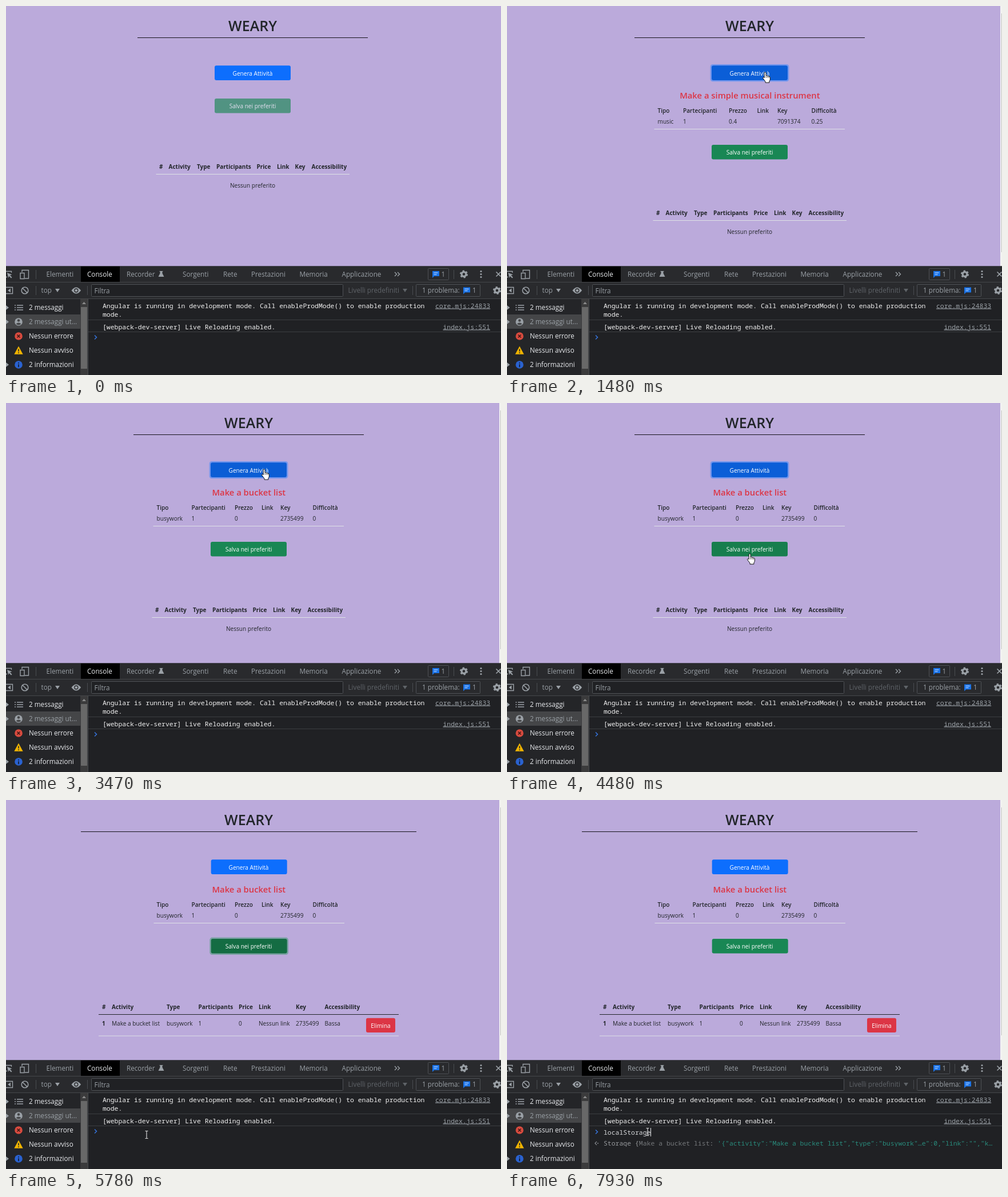
These frames come from a looping animation (866 by 646 pixels, 8 s). An HTML page:

```html
<!DOCTYPE html>
<html lang="it">
<head>
<meta charset="utf-8">
<title>Weary</title>
<style>
html, body { margin: 0; width: 100%; height: 100%; overflow: hidden; background: #bbaadb; }
svg { display: block; width: 866px; height: 646px; }
text { font: 10.1px "Open Sans", "Noto Sans", sans-serif; fill: #212529; white-space: pre; }
text.h1 { font-size: 25px; font-weight: 600; }
text.activity { font-size: 14.8px; font-weight: 600; fill: #dc3545; }
text.semi { font-weight: 600; }
text.bold { font-size: 10px; font-weight: 700; }
text.white { fill: #fff; }
text.ui { font-size: 11.7px; fill: #9aa0a6; }
text.lit { font-size: 11.7px; fill: #e8eaed; }
text.off { font-size: 11.7px; fill: #5f6368; }
text.mono, text.link { font: 500 11.46px "Noto Sans Mono", "DejaVu Sans Mono", monospace; fill: #f1f1f1; }
text.link { font-weight: 400; fill: #9aa0a6; text-decoration: underline; }
</style>
</head>
<body>
<svg viewBox="0 0 866 646" xmlns="http://www.w3.org/2000/svg">
  <g id="page"></g>
  <g id="tools"></g>
  <g id="prompt"></g>
  <g id="pointer"></g>
</svg>
<script>
const LOOP = 8000;
const T = {
  hover: 1060, focus: 1200, loaded: 1410, second: 2330, third: 3400,
  leave: 4240, saveHover: 4410, saveClick: 4830, saved: 5030,
  consoleClick: 6060, caretOff: 6570, recall: 7040, recallOff: 7530, preview: 7930
};

const text = (x, y, s, cls = '', anchor = 'start') =>
  `<text x="${x}" y="${y}" class="${cls}" text-anchor="${anchor}">${s}</text>`;
const rect = (x, y, w, h, fill, extra = '') =>
  `<rect x="${x}" y="${y}" width="${w}" height="${h}" fill="${fill}" ${extra}/>`;
const path = (d, fill, stroke = 'none', width = 1) =>
  `<path d="${d}" fill="${fill}" stroke="${stroke}" stroke-width="${width}"/>`;
const circle = (x, y, r, fill, stroke = 'none', width = 1) =>
  `<circle cx="${x}" cy="${y}" r="${r}" fill="${fill}" stroke="${stroke}" stroke-width="${width}"/>`;
const at = (x, y, body) => `<g transform="translate(${x} ${y})">${body}</g>`;
const row = (xs, y, labels, cls) => labels.map((s, i) => text(xs[i], y, s, cls)).join('');
const clamp = v => Math.max(0, Math.min(1, v));
const between = (t, a, b) => t >= a && t < b;

function mix(a, b, k) {
  const channel = (c, i) => parseInt(c.slice(1 + 2 * i, 3 + 2 * i), 16);
  return `rgb(${[0, 1, 2].map(i => Math.round(channel(a, i) + (channel(b, i) - channel(a, i)) * k))})`;
}

// Follows colour changes [time, colour], each eased over 150 ms.
function fade(t, stops) {
  let i = stops.length - 1;
  while (i > 0 && t < stops[i][0]) i--;
  return i ? mix(stops[i - 1][1], stops[i][1], clamp((t - stops[i][0]) / 150)) : stops[0][1];
}

function button(cx, y, label, fill, ring, labelX = cx) {
  const x = cx - 66.5;
  return (ring ? rect(x - 2.4, y - 2.4, 137.8, 30.4, ring, 'rx="4.5"') : '') +
    rect(x, y, 133, 25.6, fill, 'rx="3"') +
    text(labelX, y + 17.3, label, 'white', 'middle');
}

const BLUE = '#0d6efd', BLUE_HOVER = '#0b5ed7', BLUE_DOWN = '#0a58ca';
const GREEN = '#198754', GREEN_HOVER = '#157347', GREEN_DOWN = '#146c43';
const blueStops = [[0, BLUE], [T.hover, BLUE_HOVER], [T.focus, BLUE_DOWN], [1330, BLUE_HOVER],
  [2120, BLUE_DOWN], [2250, BLUE_HOVER], [3240, BLUE_DOWN], [3340, BLUE_HOVER], [T.saveClick, BLUE]];
const greenStops = [[0, GREEN], [T.saveHover, GREEN_HOVER], [T.saveClick, GREEN_DOWN], [T.consoleClick, GREEN]];

const musicColumns = [263.5, 308, 388, 437.5, 473, 532.5];
const busyColumns = [263.5, 324.5, 400, 447, 480, 536.5];
const activities = [
  [T.loaded, 'Make a simple musical instrument', musicColumns, ['music', 1, 0.4, '', 7091374, 0.25]],
  [T.second, 'Listen to a new music genre', musicColumns, ['music', 1, 0, '', 4708863, 0]],
  [T.third, 'Make a bucket list', busyColumns, ['busywork', 1, 0, '', 2735499, 0]]
];
const activityHeads = ['Tipo', 'Partecipanti', 'Prezzo', 'Link', 'Key', 'Difficoltà'];
const savedHeads = ['#', 'Activity', 'Type', 'Participants', 'Price', 'Link', 'Key', 'Accessibility'];
const emptyColumns = [268, 284.5, 334, 368, 438.5, 474, 505.5, 534.5];
const savedColumns = [168, 185, 281, 336.5, 407, 442, 507, 557.5];

function drawPage(t) {
  const loaded = t >= T.loaded, saved = t >= T.saved;
  const cx = loaded ? 424.5 : 431.5;
  const bx = saved ? 425.2 : cx;
  const ruleHalf = saved ? 293.5 : 201.5;
  const pale = '#dee2e6';
  let out = rect(0, 0, 866, 456, '#bbaadb') +
    text(cx, 43.5, 'WEARY', 'h1', 'middle') +
    rect(Math.round(cx - ruleHalf), 55, 2 * ruleHalf, 1, '#15131a') +
    button(bx, 104.3, 'Genera Attività', fade(t, blueStops),
      between(t, T.focus, T.saveClick) && 'rgba(49,132,253,.5)', cx);

  const save = button(bx, loaded ? 243 : 162, 'Salva nei preferiti', fade(t, greenStops),
    between(t, T.saveClick, T.consoleClick) && 'rgba(60,153,110,.5)', cx);
  out += loaded ? save : `<g opacity=".65">${save}</g>`;

  if (loaded) {
    const [, title, xs, values] = activities.filter(a => t >= a[0]).pop();
    out += text(cx + .3, 161.5, title, 'activity', 'middle') +
      row(xs, 186.6, activityHeads, 'semi') + row(xs, 205.8, values) +
      rect(saved ? 258.5 : 257.5, 215, 333.5, 1, pale) +
      rect(863, 0, 3, 456, '#f1f1f1') +
      rect(865, 13, 1, (saved ? 412 : 431) - 13, '#c1c1c1');
  }

  if (saved) {
    out += row(savedColumns, 366, savedHeads, 'bold') + rect(162, 375, 525, 1, '#212529') +
      text(168, 394.5, '1', 'bold') +
      row(savedColumns.slice(1), 394.5, ['Make a bucket list', 'busywork', 1, 0, 'Nessun link', 2735499, 'Bassa']) +
      rect(630, 381.7, 51, 25.3, '#dc3545', 'rx="3"') +
      text(655.5, 398.5, 'Elimina', 'white', 'middle') + rect(162, 412.5, 525, 1, pale);
  } else {
    out += at(loaded ? -7 : 0, loaded ? 81 : 0,
      row(emptyColumns, 285, savedHeads, 'bold') + rect(262.5, 294, 338.5, 1, pale) +
      text(431.5, 317.7, 'Nessun preferito', '', 'middle'));
  }
  return out;
}

const GREY = '#9aa0a6';
const separator = (x, y) => rect(x, y - 8, 1, 16, '#494c50');
const arrowDown = (x, y, fill) => path(`M${x - 4} ${y - 3}h8l-4 6z`, fill);
const arrowRight = y => path(`M0 ${y - 4}l5 4l-5 4z`, GREY);
const bubble = (x, y) => path(`M${x} ${y - 5}h12v9h-9l-3 3z`, '#1a73e8') +
  path(`M${x + 2.5} ${y - 2}h7M${x + 2.5} ${y + 1}h5`, 'none', '#cfe2ff');
const frame = (x, y, w, h, fill = 'none') => rect(x + .5, y + .5, w, h, fill, 'stroke="#4f5256" rx="1"');
const gear = (x, y) =>
  `<circle cx="${x}" cy="${y}" r="5.8" fill="none" stroke="${GREY}" stroke-width="2.6" stroke-dasharray="3.04"/>` +
  circle(x, y, 3.9, 'none', GREY, 3.2);

function drawTools() {
  const tabs = [[70.5, 'Elementi'], [211, 'Recorder'], [309, 'Sorgenti'], [380, 'Rete'],
    [429, 'Prestazioni'], [513.5, 'Memoria'], [587.5, 'Applicazione']];
  const sidebar = ['2 messaggi', '2 messaggi ut...', 'Nessun errore', 'Nessun avviso', '2 informazioni'];
  let out = rect(0, 455.5, 866, 191, '#202124') + rect(0, 455.5, 866, 57, '#292a2d') +
    rect(0, 483, 866, 1, '#45474a') + rect(0, 512, 866, 1, '#45474a') +
    rect(131, 456, 68, 27, '#000') + text(142, 474, 'Console', 'lit') +
    tabs.map(([x, s]) => text(x, 474, s, 'ui')).join('');

  // Upper toolbar
  out += path('M0 464.5H9.5V467M0 474.5H2', 'none', GREY, 1.3) + path('M2 467l8.5 3.2-3.5 1.3 3.5 3.5-1.5 1.5-3.5-3.5-1.3 3z', GREY) +
    path('M28 466V462.5H39.5V477H33', 'none', GREY, 1.4) + path('M25 467.5H32V477.5H25z', 'none', GREY, 1.4) +
    separator(52, 470) + path('M268.5 464h6v1h-1v3l3 6h-10l3-6v-3h-1z', GREY) +
    path('M680 466l3.5 3.5-3.5 3.5M685 466l3.5 3.5-3.5 3.5', 'none', GREY, 1.4) +
    frame(738, 459, 36, 20) + bubble(746, 469) + text(761.5, 474, '1', 'ui') +
    separator(783, 470) + gear(801, 469.5) +
    [464.5, 469.5, 474.5].map(y => circle(831, y, 1.6, GREY)).join('') +
    path('M857.5 465.5l8 8m0-8l-8 8', 'none', GREY, 1.7);

  // Console toolbar
  out += path('M0 492.5H11.5V503.5H0', 'none', GREY, 1.4) + path('M8 494.5v7l-5-3.5z', GREY) +
    circle(33, 498, 5.8, 'none', GREY, 1.6) + path('M29 494l8 8', 'none', GREY, 1.6) +
    separator(52, 498) + text(61.5, 502, 'top', 'ui') + arrowDown(90, 498, GREY) +
    path('M114.5 498q8.3-11 16.6 0q-8.3 11-16.6 0z', GREY) + circle(122.8, 498, 3, GREY, '#292a2d', 1.3) +
    separator(142, 498) + frame(149, 487, 440, 21, '#202124') + text(154.5, 502.5, 'Filtra', 'ui') +
    text(598.5, 502, 'Livelli predefiniti', 'off') + arrowDown(698, 498, '#5f6368') +
    separator(711, 498) + frame(717, 487, 112, 21) + text(728, 502, '1 problema:', 'ui') +
    bubble(800, 497.5) + text(816, 502, '1', 'ui') + gear(859, 498);

  // Sidebar
  out += rect(0, 513, 130, 133, '#242528') + rect(0, 540, 130, 25, '#454648') +
    rect(130, 513, 13, 133, '#3b3b3c') + rect(131, 527, 11, 108, '#686868') + rect(143, 513, 1, 133, '#494c50') +
    path('M133 522l3.5-4 3.5 4z', '#8b8b8b') +
    sidebar.map((s, i) => text(40, 532.3 + 25 * i, s, i === 1 ? 'ui' : 'lit')).join('') +
    [528, 553, 628].map(arrowRight).join('') +
    path('M15 524h2m2 0h11M15 528h2m2 0h11M15 532h2m2 0h11', 'none', GREY, 1.5) +
    circle(22, 553, 6.8, GREY) + circle(22, 550.5, 2.3, '#454648') + path('M17.5 556.5q4.5-4 9 0q-4.5 4-9 0z', '#454648') +
    circle(22, 578, 6.8, '#d94b3f') + path('M19.5 575.5l5 5m0-5l-5 5', 'none', '#3a1713', 1.5) +
    path('M22 597l6.5 12h-13z', '#f0b400', '#f0b400', 1.4) + path('M22 600.5v4.3m0 1.5v1.7', 'none', '#292a2d', 1.7) +
    circle(22, 628, 6.8, '#2a62d0') + path('M22 624v1.8m0 1.4v5', 'none', '#17233d', 1.9);

  // Messages
  return out + text(169, 528.5, 'Angular is running in development mode. Call enableProdMode() to enable production', 'mono') +
    text(169, 543.5, 'mode.', 'mono') + text(751, 528.5, 'core.mjs:24833', 'link') +
    rect(144, 549, 722, 1, '#3c3e41') +
    text(169, 565.5, '[webpack-dev-server] Live Reloading enabled.', 'mono') +
    text(764.5, 565.5, 'index.js:551', 'link') + rect(144, 570, 722, 1, '#3c3e41');
}

function drawPrompt(t) {
  const command = t >= T.preview ? 'localStorage' : t >= T.recall ? 'localStorage.clear()' : '';
  const caretOn = between(t, T.consoleClick, T.caretOff) || between(t, T.recall, T.recallOff) || t >= T.preview;
  const y = command ? 581 : 580;
  let out = path(`M155 ${y - 3.5}l3.5 3.5-3.5 3.5`, 'none', '#3674dc', 1.5) +
    `<text x="169" y="585.5" class="mono" style="fill:#d5d7da;font-weight:400">${command}</text>`;
  if (caretOn) out += rect(Math.floor(168.8 + command.length * 6.876), 574, 1, 15, '#e8eaed');
  if (t >= T.preview) {
    const span = (fill, s) => `<tspan fill="${fill}">${s}</tspan>`;
    const value = `'{"activity":"Make a bucket list","type":"busywork"…e":0,"link":"","k…`;
    out += path('M157 598l-3 3 3 3', 'none', '#85898e', 1.2) + circle(159, 601, 1, '#85898e') +
      '<clipPath id="line"><rect x="150" y="590" width="716" height="17"/></clipPath><g clip-path="url(#line)">' +
      text(169, 605, span('#96999c', 'Storage {') + span('#74777a', 'Make a bucket list') +
        span('#96999c', ': ') + span('#298b7c', value), 'mono') + '</g>';
  }
  return out;
}

const shapes = {
  arrow: path('M0 0V14.5l3.4-3.2 2.3 5.2 2.2-1-2.3-5.1h4.7z', '#fff', '#000', .9),
  hand: `<g transform="scale(.93)">${path('M-2 1.5a1.6 1.6 0 0 1 3.2 0V6.5c1.4-.8 2.8-.2 3 .6 1.2-.6 2.5 0 2.6.9 1.2-.3 2.2.3 2.2 1.5V13c0 2-1.3 3-1.6 4.2V19.5H0V17.5C-1.2 15.5-3.2 13.5-4.6 11.4c-.8-1.4.6-2.6 1.9-1.6L-2 10.5z', '#fff', '#000')}${path('M1.2 7v3.5M4.2 7.5v3M6.8 8.3v2.4', 'none', '#000', .8)}</g>`,
  beam: path('M-2.5-6.5H-.8L0-6 .8-6.5H2.5M0-6V6M-2.5 6.5H-.8L0 6 .8 6.5H2.5', 'none', '#e4e4e4', 1.1)
};

const route = [[790, 862, 238], [1130, 456, 120], [1200, 452, 116], [4200, 452, 116], [4480, 425, 264],
  [4700, 425, 261], [4960, 422.5, 261], [5430, 422.5, 261], [5690, 240, 603], [5780, 246, 586],
  [5980, 246, 586], [6330, 250, 587], [6560, 250, 587], [6590, 251, 588], [6850, 251, 588], [7330, 246, 581]];

function drawPointer(t) {
  if (t < route[0][0]) return '';
  let i = route.length - 1;
  while (t < route[i][0]) i--;
  const [t0, x0, y0] = route[i], [t1, x1, y1] = route[i + 1] || [LOOP, x0, y0];
  const p = clamp((t - t0) / (t1 - t0)), k = p * p * (3 - 2 * p);
  const x = x0 + (x1 - x0) * k, y = y0 + (y1 - y0) * k;
  const saveTop = t < T.loaded ? 162 : 243;
  const overButton = x > 358 && x < 495 && (between(y, 104, 130) || between(y, saveTop, saveTop + 26));
  const shape = overButton ? 'hand' : y > 570 ? 'beam' : 'arrow';
  const held = t >= 4430 && t < 5450;
  return at(x.toFixed(1), y.toFixed(1), shapes[held ? 'hand' : shape]);
}

const layers = { page: drawPage, prompt: drawPrompt, pointer: drawPointer };
const shown = {};
document.getElementById('tools').innerHTML = drawTools();

function render(t) {
  for (const id in layers) {
    const markup = layers[id](t);
    if (markup !== shown[id]) document.getElementById(id).innerHTML = shown[id] = markup;
  }
}

const start = performance.now();
function tick() {
  render((performance.now() - start) % LOOP);
  requestAnimationFrame(tick);
}
tick();
</script>
</body>
</html>
```
